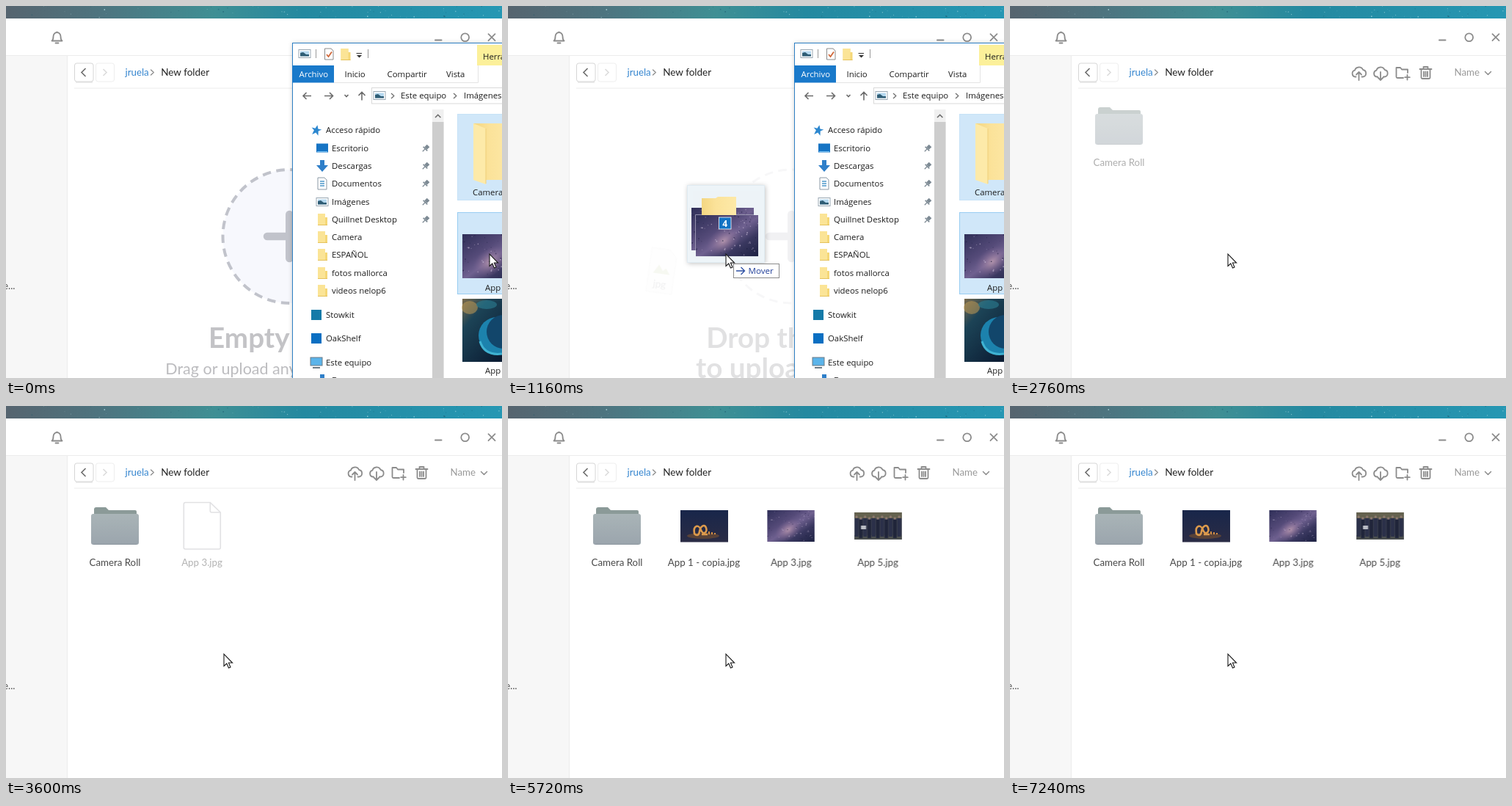
These frames come from a looping animation (676x507 px, 7.32 s). An HTML page:

```html
<!DOCTYPE html>
<html lang="es">
<head>
<meta charset="utf-8">
<title>Drag files into a folder</title>
<style>
html, body { margin: 0; width: 100%; height: 100%; overflow: hidden; background: #fff; }
svg { display: block; }
text { font-family: Lato, sans-serif; font-size: 13.3px; fill: #4a4a4a; }
.win text { font-family: "Open Sans", "Noto Sans", sans-serif; font-size: 11.4px; fill: #1c1c1c; }
.mid { text-anchor: middle; }
.big { font-size: 38.6px; font-weight: 700; fill: #c3c3c6; }
.sub { font-size: 21.5px; fill: #bcbcbf; }
.ring { stroke-dasharray: 11.5 7.56; stroke-dashoffset: 9.5; }
.ico { fill: none; stroke: #8c8c8c; stroke-width: 1.8; stroke-linecap: round; stroke-linejoin: round; }
.arrow { fill: none; stroke: #6b6b6b; stroke-width: 1.6; }
.busy text { opacity: .42; }

.a { animation: 7.32s linear infinite; }
.step { animation-timing-function: step-end; }
.hand { animation-name: hand; animation-timing-function: ease-in-out; }
.ghost { animation-name: ghost; }
.empty { animation-name: empty; }
.drop { animation-name: drop; }
.fly { animation-name: fly; transform-origin: 386px 314px; }
.win { animation-name: win; }
.folderBusy { animation-name: folderBusy; }
.folderDone { animation-name: folderDone; }
.skyBusy { animation-name: skyBusy; }
.skyDone { animation-name: skyDone; }
.teamBusy { animation-name: teamBusy; }
.teamDone { animation-name: teamDone; }
.fireBusy { animation-name: fireBusy; }
.fireDone { animation-name: fireDone; }
.firePic { animation-name: firePic; }
.shift { animation-name: shift; }

@keyframes hand { 0%, 4.1% { transform: translateX(362px); } 14.5%, 100% { transform: none; } }
@keyframes ghost { 0% { opacity: 0; } 4.92% { opacity: 1; } 19.67%, 100% { opacity: 0; } }
@keyframes empty {
  0%, 13.1% { opacity: 1; } 15.3%, 21.3% { opacity: 0; }
  23.5%, 29% { opacity: 1; } 30.6%, 100% { opacity: 0; }
}
@keyframes drop { 0%, 13.7% { opacity: 0; } 18%, 19.7% { opacity: 1; } 21.3%, 100% { opacity: 0; } }
@keyframes fly { 0%, 13.7% { transform: scale(.6); } 15.85%, 100% { transform: none; } }
@keyframes win { 0% { opacity: 1; } 22.4%, 100% { opacity: 0; } }
@keyframes folderBusy { 0% { opacity: 0; } 31.7% { opacity: .45; } 42.35%, 100% { opacity: 0; } }
@keyframes folderDone { 0% { opacity: 0; } 42.35%, 100% { opacity: 1; } }
@keyframes skyBusy { 0% { opacity: 0; } 38.25% { opacity: 1; } 54.6%, 100% { opacity: 0; } }
@keyframes skyDone { 0% { opacity: 0; } 54.6%, 100% { opacity: 1; } }
@keyframes teamBusy { 0% { opacity: 0; } 54.6% { opacity: 1; } 58.47%, 100% { opacity: 0; } }
@keyframes teamDone { 0% { opacity: 0; } 58.47%, 100% { opacity: 1; } }
@keyframes fireBusy { 0% { opacity: 0; } 61.2% { opacity: 1; } 64.5%, 100% { opacity: 0; } }
@keyframes fireDone { 0% { opacity: 0; } 64.5%, 100% { opacity: 1; } }
@keyframes firePic { 0%, 72.4% { opacity: 0; } 74%, 100% { opacity: 1; } }
@keyframes shift { 0% { transform: translateX(-118.7px); } 61.2%, 100% { transform: none; } }
</style>
</head>
<body>
<svg width="676" height="507" viewBox="0 0 676 507">
  <defs>
    <linearGradient id="sky">
      <stop offset="0" stop-color="#56646f"/><stop offset=".2" stop-color="#4d7580"/>
      <stop offset=".42" stop-color="#3f8f94"/><stop offset=".6" stop-color="#2489a0"/>
      <stop offset="1" stop-color="#2697b3"/>
    </linearGradient>
    <linearGradient id="night" x2="1" y2="1">
      <stop offset="0" stop-color="#2f2f58"/><stop offset=".35" stop-color="#544a78"/>
      <stop offset=".52" stop-color="#6f6190"/><stop offset=".72" stop-color="#3a3860"/>
      <stop offset="1" stop-color="#1d2142"/>
    </linearGradient>
    <radialGradient id="glow"><stop offset="0" stop-color="#cfa9b8" stop-opacity=".7"/><stop offset="1" stop-color="#8a6a98" stop-opacity="0"/></radialGradient>
    <linearGradient id="steel" x2="0" y2="1"><stop offset="0" stop-color="#a9b4b7"/><stop offset="1" stop-color="#9ba5ad"/></linearGradient>
    <linearGradient id="manila"><stop offset="0" stop-color="#f3d682"/><stop offset=".4" stop-color="#fbe299"/><stop offset="1" stop-color="#fde9a8"/></linearGradient>
    <linearGradient id="dusk" x2="0" y2="1"><stop offset="0" stop-color="#18264a"/><stop offset="1" stop-color="#2b2c45"/></linearGradient>
    <linearGradient id="nebula" x2=".8" y2="1"><stop offset="0" stop-color="#7a6a4c"/><stop offset=".3" stop-color="#1c4356"/><stop offset="1" stop-color="#0b1c33"/></linearGradient>
    <filter id="soft" x="-20%" y="-20%" width="140%" height="140%"><feDropShadow dx="1" dy="1" stdDeviation="3" flood-opacity=".25"/></filter>
    <clipPath id="frame"><rect width="65" height="43"/></clipPath>

    <g id="galaxy" clip-path="url(#frame)">
      <rect width="65" height="43" fill="url(#night)"/>
      <ellipse cx="29" cy="27" rx="20" ry="13" fill="url(#glow)" transform="rotate(-35 29 27)"/>
      <g id="stars"/>
    </g>
    <g id="file">
      <path d="M0 2.5a2 2 0 0 1 2-2H36L50 14V62a2 2 0 0 1-2 2H2a2 2 0 0 1-2-2Z" fill="#fff" stroke="#e1e1e3" stroke-width="1.6"/>
      <path d="M36 .5V12a2 2 0 0 0 2 2H50" fill="none" stroke="#e1e1e3" stroke-width="1.6"/>
    </g>
    <g id="folder">
      <path d="M4 12V3a3 3 0 0 1 3-3H20l4 4H60a2 2 0 0 1 2 2V14H4Z" fill="#8b9a98"/>
      <rect y="9" width="65" height="42" rx="3" fill="url(#steel)"/>
      <path d="M3 50.5H62" stroke="#8b959d"/>
    </g>
    <g id="dir"><path d="M-6-8H4V-3H7V8H-6Z" fill="#f5d777"/><path d="M-6-8H4V8H-6Z" fill="#fbe496"/><path d="M-6 7.500H7" stroke="#e5c25c"/></g>
    <g id="pic"><rect x="-8" y="-5.5" width="16" height="11" fill="#fff" stroke="#9aa8b3"/><rect x="-6" y="-3.5" width="12" height="7" fill="#b5d8ef"/><path d="M-6 3.500V-1L-2-2 2 1 6 1V3.500Z" fill="#2f5d75"/></g>
    <g id="screen"><rect x="-8" y="-6.5" width="16" height="12" fill="#1674c4"/><path d="M-7 4.500H7" stroke="#7cc4f5"/></g>
    <g id="down"><path d="M-3-8H3V-1H8L0 8-8-1H-3Z" fill="#2f7fc9"/></g>
    <g id="doc"><path d="M-6-8H3L6-5V8H-6Z" fill="#fff" stroke="#8b99a5"/><path d="M-3-3H3M-3 0H3M-3 3H3" stroke="#4b97c9" stroke-width="1.6"/></g>
    <g id="star"><path d="M0-7 2-2H7L3 1 4 7 0 3.500-4.500 7-3 1-7-2H-2Z" fill="#2c87cf" transform="rotate(12)"/></g>
    <g id="pc"><rect x="-8" y="-7" width="16" height="11" fill="#5bb4ea" stroke="#6c7b86"/><path d="M-5 7H5" stroke="#6c7b86" stroke-width="2"/></g>
    <g id="boxA"><rect x="-7" y="-7" width="14" height="14" fill="#147aa8"/></g>
    <g id="boxB"><rect x="-7" y="-7" width="14" height="14" fill="#0a6fc2"/></g>
    <g id="pin" fill="#7d8a94" transform="rotate(45)"><rect x="-2.5" y="-5" width="5" height="5"/><rect x="-4" width="8" height="1.6"/><rect x="-.6" y="1" width="1.2" height="5"/></g>
    <path id="cloud" d="M-4 6H-5A4.500 4.500 0 0 1-5.600-2.800 6 6 0 0 1 5.600-3.500 4.800 4.800 0 0 1 5.500 6H4"/>
    <path id="chev" d="M-2-3.500 1.800 0-2 3.500"/>
    <path id="plus" d="M356 314H416.500M386.300 284V344" stroke-width="10.5" stroke-linecap="round"/>
  </defs>

  <!-- app window -->
  <rect width="676" height="507" fill="#fff"/>
  <rect width="676" height="17" fill="url(#sky)"/>
  <g id="specks"/>
  <rect y="68" width="83" height="439" fill="#f7f7f7"/>
  <path d="M0 67.500H676M83.500 68V507M93 112H676" stroke="#ececec"/>
  <text x="-4" y="386" fill="#333">e...</text>
  <g class="ico">
    <path d="M62.500 47.500H76.500C74.500 46 74.500 44 74.500 41.500A5 5.500 0 0 0 64.500 41.500C64.500 44 64.500 46 62.500 47.500ZM67.500 50.500H71.500M69.500 35.500V36"/>
    <path d="M585 46.500H593.500" stroke-width="2"/>
    <circle cx="625.700" cy="42.700" r="5.400"/>
    <path d="M657.500 38.200 666.500 47.200M666.500 38.200 657.500 47.200"/>
    <use href="#cloud" x="475.500" y="90.500"/><path d="M475.500 101V90M472 93.500 475.500 90 479 93.500"/>
    <use href="#cloud" x="505" y="90.500"/><path d="M505 90V101M501.500 97.500 505 101 508.500 97.500"/>
    <path d="M536 98H528Q526.500 98 526.500 96.500V84H532L534 86.500H542V91M541.500 94V100.500M538.200 97.200H544.800"/>
    <path d="M558.500 86H574.500M563.500 86V83H569.500V86M560.500 86.500V97.500Q560.500 99 562 99H571Q572.500 99 572.500 97.500V86.500M564 89.500V96M566.500 89.500V96M569 89.500V96"/>
    <path d="M647.500 89.500 651.500 93.500 655.500 89.500" stroke-width="1.5"/>
    <use href="#chev" x="199.500" y="90.500" stroke-width="1.3"/>
  </g>
  <text x="605.500" y="95.300" style="fill:#999">Name</text>
  <rect x="93.500" y="78" width="25.500" height="25" rx="3" fill="#fff" stroke="#d6d6d6"/>
  <path d="M95 104H118" stroke="#d8d8d8"/>
  <path d="M108.500 85 103 90.500 108.500 96" class="arrow"/>
  <rect x="122.500" y="78" width="25" height="25" rx="3" fill="#fff" stroke="#eee"/>
  <path d="M132.500 86 137 90.500 132.500 95" class="arrow" style="stroke:#dcdcdc"/>
  <text x="162.500" y="94.500" style="fill:#3585cf">jruela</text>
  <text x="211.200" y="94.500" style="fill:#222;font-size:13.5px">New folder</text>

  <!-- empty folder -->
  <g class="a empty">
    <circle class="ring" cx="386.500" cy="314" r="91" fill="#f7f8fd" stroke="#c1c3cb" stroke-width="4"/>
    <use href="#plus" stroke="#c1c3cb"/>
    <text class="mid big" x="386.500" y="466">Empty folder</text>
    <text class="mid sub" x="386.500" y="502">Drag or upload any file from your pc</text>
  </g>

  <!-- drop hint -->
  <g class="a drop">
    <circle class="ring" cx="386.500" cy="314" r="91" fill="none" stroke="#f0f0f2" stroke-width="3"/>
    <use href="#plus" stroke="#e4e4e8"/>
    <g class="a fly" id="flying"/>
    <text class="mid big" x="386.500" y="466">Drop the files</text>
    <text class="mid big" x="386.500" y="507">to upload them</text>
  </g>

  <!-- uploaded items -->
  <g class="a step folderBusy"><use href="#folder" x="116" y="138"/><text class="mid" x="148.500" y="218">Camera Roll</text></g>
  <g class="a step folderDone"><use href="#folder" x="116" y="138"/><text class="mid" x="148.500" y="218">Camera Roll</text></g>
  <g class="a step shift">
    <g class="a step busy skyBusy"><use href="#file" x="361" y="131"/><text class="mid" x="385.700" y="218">App 3.jpg</text></g>
    <g class="a step skyDone"><use href="#galaxy" x="353" y="142"/><text class="mid" x="385.700" y="218">App 3.jpg</text></g>
    <g class="a step busy teamBusy"><use href="#file" x="479" y="131"/><text class="mid" x="504" y="218">App 5.jpg</text></g>
    <g class="a step teamDone">
      <rect x="472" y="145" width="65" height="37" fill="#3d4150"/>
      <path d="M472 145H537V153H472Z" fill="#65624f"/><path d="M472 176H537V182H472Z" fill="#4a4e4e"/>
      <g id="team"/>
      <rect x="481" y="163" width="7" height="5" fill="#b9bcc4"/>
      <text class="mid" x="504" y="218">App 5.jpg</text>
    </g>
  </g>
  <g class="a step busy fireBusy"><use href="#file" x="242" y="131"/><text class="mid" x="267" y="218">App 1 - copia.jpg</text></g>
  <g class="a step fireDone"><text class="mid" x="267" y="218">App 1 - copia.jpg</text></g>
  <g class="a firePic">
    <rect x="235" y="142" width="65" height="43.500" fill="url(#dusk)"/>
    <ellipse cx="266" cy="177" rx="22" ry="4" fill="#7a5330" opacity=".6"/>
    <path d="M254 174C252 162 260 161 263 169S272 172 270 166 262 164 261 171 256 176 254 174ZM264 175H272" fill="none" stroke="#dc9a4c" stroke-width="2.6"/>
    <path d="M274 175V171M278 175V172M282 175V173" stroke="#d08d45" stroke-width="2"/>
  </g>

  <!-- file explorer -->
  <g class="a step win">
    <rect x="390.500" y="50.500" width="300" height="470" fill="#fff" stroke="#2f80c4" filter="url(#soft)"/>
    <use href="#pic" x="407" y="65"/>
    <path d="M422.500 59V71M493.500 59V71" stroke="#9a9a9a"/>
    <path d="M434.500 58H443L446 61V73H434.500Z" fill="#fff" stroke="#8b8b8b"/><path d="M437 66 439.500 69 444 62.500" fill="none" stroke="#d0683a" stroke-width="1.8"/>
    <use href="#dir" x="462.500" y="66"/>
    <path d="M477.500 64.500H485" stroke="#333"/><path d="M478 67H485L481.500 70.500Z" fill="#333"/>
    <rect x="642" y="53" width="34" height="28" fill="#fcf09a"/>
    <rect x="390" y="81" width="57" height="23.500" fill="#1979ca"/>
    <path d="M447 104.500H643.500V81" fill="none" stroke="#e4e4e4"/>
    <text x="650" y="72.500">Herramientas</text>
    <text x="399.500" y="97.300" style="fill:#fff">Archivo</text>
    <text x="461.500" y="97.300">Inicio</text><text x="519.500" y="97.300">Compartir</text><text x="600" y="97.300">Vista</text>
    <path class="arrow" d="M416 122.500H405M409.500 118 405 122.500 409.500 127M434 122.500H445.500M441 118 445.500 122.500 441 127M485 128.500V117.500M480.500 122 485 117.500 489.500 122"/>
    <path class="arrow" d="M461.500 121 464 123.500 466.500 121"/>
    <rect x="498.500" y="111.500" width="190" height="21.500" fill="#fff" stroke="#d9d9d9"/>
    <use href="#pic" x="509" y="122"/>
    <g class="arrow" style="stroke-width:1.2"><use href="#chev" x="527" y="122.500"/><use href="#chev" x="612" y="122.500"/></g>
    <text x="538" y="126.300">Este equipo</text><text x="624" y="126.300">Imágenes</text>
    <rect x="581" y="141" width="15.500" height="366" fill="#f0f0f0"/><rect x="581" y="158" width="15.500" height="349" fill="#cdcdcd"/>
    <path class="arrow" d="M585 152 588.700 148.300 592.400 152"/>
    <g id="nav"/>
    <rect x="615.500" y="147.500" width="70" height="117" fill="#d0e7f9" stroke="#c6e2f7"/>
    <path d="M637 160H690V237H637Z" fill="url(#manila)"/><path d="M637 160 654 167V243L637 237Z" fill="#fdeaa9"/>
    <path d="M654 167V242" stroke="#efd07a"/>
    <text x="636" y="258">Camera Roll</text>
    <rect x="615.500" y="281.500" width="70" height="111" fill="#d0e7f9" stroke="#99cdf2"/>
    <use href="#galaxy" transform="translate(622 311) scale(1.31 1.395)"/>
    <text x="653" y="387.500">App 3</text>
    <rect x="622" y="399" width="60" height="86" fill="url(#nebula)"/>
    <ellipse cx="632" cy="411" rx="11" ry="9" fill="#c09a55" opacity=".55"/>
    <ellipse cx="655" cy="407" rx="14" ry="6" fill="#2c7f92" opacity=".6"/>
    <circle cx="669" cy="449" r="25" fill="#1c82ad"/><circle cx="678" cy="444" r="23" fill="#12466b"/>
    <path d="M646 457Q652 477 676 474" fill="none" stroke="#3fb2d2" stroke-width="3"/>
    <text x="653" y="500.500">App 4</text>
  </g>

  <!-- pointer and dragged stack -->
  <g class="a hand">
    <g class="a step ghost">
      <rect x="244.500" y="244.500" width="105" height="105" fill="#eef5f9" fill-opacity=".94" stroke="#e0ebf2" filter="url(#soft)"/>
      <use href="#galaxy" transform="translate(250 275) scale(1.31 1.35)"/>
      <path d="M255.500 333V284.500H335" fill="none" stroke="#a9a5bd" stroke-width=".8"/>
      <use href="#galaxy" transform="translate(256 285) scale(1.31)"/>
      <path d="M264 262H283L286 260H311V285H264Z" fill="url(#manila)"/>
      <rect x="287.500" y="288" width="16.500" height="16" fill="#1272c4" stroke="#fff" stroke-width=".8"/>
      <text class="mid" x="295.800" y="300.500" style="font:700 12px 'Open Sans',sans-serif;fill:#fff">4</text>
      <rect x="307.500" y="351.500" width="62" height="19" fill="#fff" stroke="#8a8a8a"/>
      <path d="M311 361H322M317.500 356 322.500 361 317.500 366" fill="none" stroke="#2c4fa3" stroke-width="1.3"/>
      <text x="327.500" y="365" style="font:11.6px 'Open Sans',sans-serif;fill:#22409a">Mover</text>
    </g>
    <path d="M297 338V354.500L300.800 351 303.500 357 306 356 303.400 350H308.600Z" fill="#fff" stroke="#1a1a1a" stroke-width="1.1"/>
  </g>
</svg>
<script>
const el = id => document.getElementById(id);
const fill = (id, parts) => { el(id).innerHTML = parts.join(""); };
const many = (n, make) => Array.from({ length: n }, (_, i) => make(i));

let seed = 7;
const rnd = () => (seed = seed * 16807 % 2147483647) / 2147483647;
const dot = (w, h, r, color) =>
  `<circle cx="${rnd() * w}" cy="${rnd() * h}" r="${r * (.5 + rnd())}" fill="${color}" opacity="${.2 + rnd() * .5}"/>`;

fill("specks", many(70, i => dot(676, 16, .6, i % 3 ? "#bfe6ea" : "#1f5a70")));
fill("stars", many(90, i => dot(65, 43, .5, i % 2 ? "#d9cbe4" : "#1a1a3c")));
fill("team", many(11, i => {
  const x = 475 + i * 5.8, y = 151 + i % 2 * 2;
  return `<circle cx="${x}" cy="${y}" r="1.7" fill="#8f7a70"/>
    <rect x="${x - 2.4}" y="${y + 2}" width="4.8" height="25" fill="${i % 2 ? "#20253a" : "#2b3049"}"/>`;
}));

const page = (x, y, turn, name) => `<g transform="translate(${x} ${y}) rotate(${turn})" opacity=".7">
  <path d="M-17-30H8L18-20V30H-17Z" fill="#fdfdfd" stroke="#f3f3f3"/>
  <path d="M-11 4-4-8 2 0 6-4 12 4Z" fill="#e7ecd8"/>
  <text class="mid" y="23" style="fill:#d3d3d6">${name}</text></g>`;
fill("flying", [page(209, 361, 8, "jpg")]);

const places = [
  ["star", "Acceso rápido", 169], ["screen", "Escritorio", 194], ["down", "Descargas", 218],
  ["doc", "Documentos", 242], ["pic", "Imágenes", 267], ["dir", "Quillnet Desktop", 291],
  ["dir", "Camera", 315], ["dir", "ESPAÑOL", 339], ["dir", "fotos mallorca", 364],
  ["dir", "videos nelop6", 388], ["boxA", "Stowkit", 421], ["boxB", "OakShelf", 453],
  ["pc", "Este equipo", 486], ["down", "Descargas", 510]
];
const roots = ["star", "boxA", "boxB", "pc"];
fill("nav", places.map(([icon, name, y], i) => {
  const x = roots.includes(icon) ? 436 : 444;
  const pin = i > 0 && i < 6 ? `<use href="#pin" x="0" y="0" transform="translate(572 ${y})"/>` : "";
  return `<use href="#${icon}" x="${x - 13}" y="${y}"/><text x="${x}" y="${y + 4}">${name}</text>${pin}`;
}));
</script>
</body>
</html>
```
